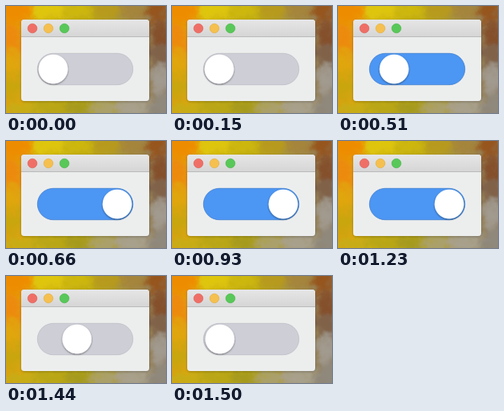
An HTML page that plays this animation: 200x134 px, repeating every 1.53 s.

```html
<!DOCTYPE html>
<html lang="en">
<head>
<meta charset="utf-8">
<title>Toggle switch</title>
<style>
  html, body { margin: 0; width: 100%; height: 100%; overflow: hidden; }
  svg { display: block; width: 100%; height: 100%; }
</style>
</head>
<body>
<svg viewBox="0 0 200 134">
  <defs>
    <linearGradient id="base">
      <stop offset="0" stop-color="#e6980a"/>
      <stop offset=".25" stop-color="#d3b80e"/>
      <stop offset=".55" stop-color="#b9a616"/>
      <stop offset=".8" stop-color="#a08a4a"/>
      <stop offset="1" stop-color="#8c7860"/>
    </linearGradient>
    <linearGradient id="bar" x2="0" y2="1">
      <stop offset="0" stop-color="#e6e6e6"/>
      <stop offset="1" stop-color="#d5d5d5"/>
    </linearGradient>
    <filter id="powdery" filterUnits="userSpaceOnUse" x="-20" y="-20" width="240" height="174">
      <feGaussianBlur stdDeviation="5" result="cloud"/>
      <feTurbulence type="fractalNoise" baseFrequency=".08" numOctaves="4" seed="4"/>
      <feDisplacementMap in="cloud" scale="18" xChannelSelector="R" yChannelSelector="G"/>
    </filter>
    <filter id="windowShadow" x="-20%" y="-20%" width="140%" height="150%">
      <feDropShadow dx="0" dy="1" stdDeviation="1.5" flood-opacity=".25"/>
    </filter>
    <filter id="knobShadow" x="-20%" y="-20%" width="140%" height="150%">
      <feDropShadow dx="0" dy="1" stdDeviation="1.3" flood-opacity=".5"/>
    </filter>
  </defs>

  <rect width="200" height="134" fill="url(#base)"/>
  <g id="powder" filter="url(#powdery)"></g>

  <rect x="19" y="17" width="160" height="102" rx="4" fill="#eceeee" filter="url(#windowShadow)"/>
  <path d="M19 39V21a4 4 0 0 1 4-4H175a4 4 0 0 1 4 4V39Z" fill="url(#bar)"/>
  <path d="M19 38.5H179" stroke="#bababa"/>
  <g stroke-width=".7">
    <circle cx="33" cy="28" r="5.8" fill="#ef6f66" stroke="#de625a"/>
    <circle cx="53" cy="28" r="5.8" fill="#f5c04f" stroke="#e3b046"/>
    <circle cx="73" cy="28" r="5.8" fill="#58c858" stroke="#4bb84b"/>
  </g>

  <rect id="track" x="39.3" y="59.3" width="119.4" height="39.4" rx="19.7" stroke-width=".7"/>
  <circle id="knob" cy="79" r="18.3" fill="#fff" filter="url(#knobShadow)"/>
</svg>
<script>
  const LOOP = 1530, TURN_ON = 449, TURN_OFF = 1337, SLIDE = 190, FADE = 60;
  const OFF = { x: 59, fill: [206, 206, 215], edge: [186, 186, 194] };
  const ON = { x: 139, fill: [76, 150, 244], edge: [62, 122, 200] };

  // Soft clouds: x, y, horizontal radius, vertical radius, colour
  const clouds = [
    [10, 6, 24, 16, '#ee8c06'], [52, 5, 22, 11, '#dfc60a'],
    [90, 5, 22, 10, '#cdb808'], [126, 5, 22, 10, '#b79a1c'],
    [158, 5, 18, 10, '#a5843a'], [190, 6, 16, 14, '#96551c'],
    [6, 42, 16, 18, '#ec8a08'], [5, 72, 15, 15, '#e0a60c'],
    [6, 100, 16, 16, '#c9a60c'], [18, 130, 24, 12, '#c8ac12'],
    [56, 128, 24, 12, '#b9a614'], [92, 128, 22, 11, '#a69a1a'],
    [124, 128, 18, 11, '#aaa06a'], [158, 128, 24, 12, '#a8a08c'],
    [193, 36, 15, 16, '#84502c'], [193, 62, 15, 14, '#80624a'],
    [193, 92, 15, 18, '#a19a8e'], [194, 124, 16, 14, '#8f887c']
  ];
  const byId = id => document.getElementById(id);
  const track = byId('track'), knob = byId('knob');
  byId('powder').innerHTML = clouds.map(([x, y, rx, ry, color]) =>
    `<ellipse cx="${x}" cy="${y}" rx="${rx}" ry="${ry}" fill="${color}"/>`).join('');

  const progress = (time, start, span) => Math.min(1, Math.max(0, (time - start) / span));
  const ease = t => t < .5 ? 4 * t ** 3 : 1 - 4 * (1 - t) ** 3;
  const mix = (a, b, t) => a + (b - a) * t;
  const color = (key, t) => `rgb(${OFF[key].map((v, i) => Math.round(mix(v, ON[key][i], t)))})`;

  function draw(time) {
    const slide = ease(progress(time, TURN_ON, SLIDE)) - ease(progress(time, TURN_OFF, SLIDE));
    const tint = progress(time, TURN_ON - 15, FADE) - progress(time, TURN_OFF - 18, FADE);
    knob.setAttribute('cx', mix(OFF.x, ON.x, slide));
    track.setAttribute('fill', color('fill', tint));
    track.setAttribute('stroke', color('edge', tint));
  }

  const start = performance.now();
  function tick() {
    draw((performance.now() - start) % LOOP);
    requestAnimationFrame(tick);
  }
  tick();
</script>
</body>
</html>
```
